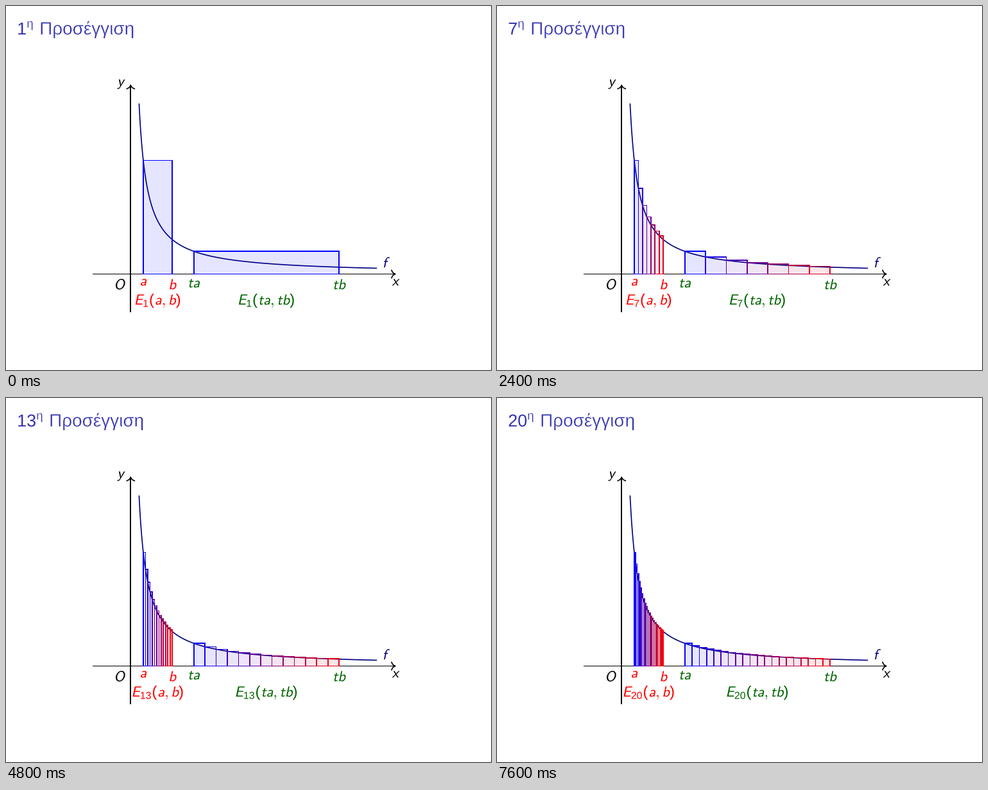
A matplotlib script that plays this animation: 756x567 px, repeating every 8000 ms.

```python
import numpy as np
import matplotlib as mpl
import matplotlib.pyplot as plt
from matplotlib.animation import FuncAnimation
from matplotlib.collections import PolyCollection
from matplotlib.patches import PathPatch
from matplotlib.path import Path
from matplotlib.textpath import TextPath
from matplotlib.transforms import Affine2D

mpl.rcParams["mathtext.fontset"] = "cm"

W, H, DPI = 756, 567, 72          # at 72 dpi one point is one pixel
STEPS, STEP_MS = 20, 400
UNIT = 59.0625                    # pixels per axis unit
X0, Y0 = 194.28, 417.57           # origin of the plot
LINE = 1.66
A, B, T = 1 / 3, 1.1, 5

NAVY = (0, 0, 0.5)
RED = (1, 0, 0)
GREEN = (0, 0.4, 0)
TITLE = (0.2, 0.2, 0.7)

EM, SUB_EM, TITLE_EM, GREEK_EM = 22.74, 17.6, 29.9, 27.9
TITLE_Y, AREA_Y = 44.4, 465.3
SLANT = 0.2126
ADVANCE = {"E": 0.597, "O": 0.736, "a": 0.481, "b": 0.517, "f": 0.306,
           "t": 0.361, "x": 0.461, "y": 0.461, "(": 0.389, ")": 0.389,
           ",": 0.445}
SANS = {"family": "Liberation Sans"}

fig = plt.figure(figsize=(W / DPI, H / DPI), dpi=DPI, facecolor="white")
ax = fig.add_axes([0, 0, 1, 1])
ax.set_xlim(0, W)
ax.set_ylim(H, 0)
ax.axis("off")

glyphs = {}


def px(x):
    return X0 + UNIT * x


def py(y):
    return Y0 - UNIT * y


def place(path, x, y, color, slant=0):
    path = Affine2D.from_values(1, 0, slant, -1, x, y).transform_path(path)
    return ax.add_patch(PathPatch(path, fc=color, lw=0, zorder=5))


def make_glyph(ch, size):
    if ch.isdigit():
        return TextPath((0, 0), ch, size=0.9 * size, prop=SANS)
    if ch in "()":
        return TextPath((0, 0), ch, size=1.05 * size, prop=SANS)
    return TextPath((0, 0), r"$\mathsf{%s}$" % ch, size=size)


def glyph(ch, size):
    if (ch, size) not in glyphs:
        glyphs[ch, size] = make_glyph(ch, size)
    return glyphs[ch, size]


def advance(s, size):
    return size * sum(ADVANCE.get(ch, 0.5) for ch in s)


def run(s, x, y, color, size=EM):
    """Set a run of sans math, letters slanted, and return its patches."""
    out = []
    for ch in s:
        slant = SLANT if ch.isalpha() else 0
        out.append(place(glyph(ch, size), x, y, color, slant))
        x += advance(ch, size)
    return out


def centered(s, x, y, color):
    return run(s, x - advance(s, EM) / 2, y, color)


def greek(s, size, x, y):
    """Greek title text, thinned a little by a white outline."""
    patch = place(TextPath((0, 0), s, size=size, prop=SANS), x, y, TITLE)
    patch.set(edgecolor="white", linewidth=0.35)
    return patch


def area_label(n, args, x, y, color):
    sub, tail = str(n), "(%s)" % args
    sub_w = advance(sub, SUB_EM) + 1
    left = x - (advance("E" + tail, EM) + sub_w) / 2
    sub_x = left + advance("E", EM)
    return (run("E", left, y, color)
            + run(sub, sub_x, y + 3.4, color, SUB_EM)
            + run(tail, sub_x + sub_w, y, color))


def title(n):
    num = str(n)
    x = 17.2
    out = run(num, x, TITLE_Y, TITLE, TITLE_EM)
    x += advance(num, TITLE_EM)
    out.append(greek("η", 19.1, x, 33.8))
    out.append(greek("Προσέγγιση", GREEK_EM, x + 20, TITLE_Y))
    return out


def snap(c):
    """Pixel edges of a grid-fitted stroke centred on c."""
    lo = round(c - LINE / 2)
    return lo, max(round(c + LINE / 2), lo + 1)


def box(x0, y0, x1, y1):
    return [(x0, y0), (x1, y0), (x1, y1), (x0, y1)]


def bars(start, stop, n):
    """Boxes and colours of n outlined bars with left-end heights."""
    boxes, colors = [], []
    edges = np.linspace(start, stop, n + 1)
    base = snap(Y0)
    for i, (u, v) in enumerate(zip(edges[:-1], edges[1:])):
        rgb = (i / n, 0, 1 - i / n)
        left, right, top = snap(px(u)), snap(px(v)), snap(py(1 / u))
        boxes += [box(px(u), py(1 / u), px(v), base[1]),
                  box(left[0], top[0], left[1], base[1]),
                  box(right[0], top[0], right[1], base[1]),
                  box(left[0], top[0], right[1], top[1]),
                  box(left[0], base[0], right[1], base[1])]
        colors += [rgb + (0.1,)] + [rgb + (1,)] * 4
    return boxes, colors


def solid(boxes, colors, zorder):
    return ax.add_collection(PolyCollection(
        boxes, facecolors=colors, linewidths=0, edgecolors="none",
        antialiaseds=False, zorder=zorder), autolim=False)


def arrow_tip(x, y, up):
    pts = np.array([(-5.8, -6.2), (-4.7, -2.5), (-2.4, -0.7), (0, 0),
                    (-2.4, 0.7), (-4.7, 2.5), (-5.8, 6.2)])
    if up:
        pts = np.column_stack([pts[:, 1], -pts[:, 0]])
    path = Path(pts + (x, y), [Path.MOVETO] + [Path.CURVE4] * 6)
    ax.add_patch(PathPatch(path, fc="none", ec="black", lw=LINE,
                           capstyle="round", joinstyle="round", zorder=1))


def draw_static():
    col, row = snap(X0), snap(Y0)
    solid([box(round(px(-1)), row[0], round(px(7) - 1), row[1]),
           box(col[0], round(py(5) + 1), col[1], round(py(-1)))],
          ["black"] * 2, 1)
    arrow_tip(px(7) - 0.9, Y0, False)
    arrow_tip(X0, py(5) + 0.9, True)

    xs = np.geomspace(1 / 4.5, 6.5, 400)
    ax.plot(px(xs), py(1 / xs), color=NAVY, lw=LINE, zorder=2,
            solid_capstyle="butt")

    run("y", 173.3, 124.7, "black")
    run("O", 168.3, 441.3, "black")
    run("f", 586.8, 407.3, NAVY)
    centered("x", px(7) - 1, 435.6, "black")
    centered("a", px(A), 435.6, RED)
    centered("b", px(B), 441.3, RED)
    centered("ta", px(T * A), 438.5, GREEN)
    centered("tb", px(T * B), 441.3, GREEN)


moving = []


def update(i):
    n = i + 1
    while moving:
        moving.pop().remove()
    for k in (1, T):
        moving.append(solid(*bars(k * A, k * B, n), 3))
    mid = (A + B) / 2
    moving.extend(title(n))
    moving.extend(area_label(n, "a,b", px(mid), AREA_Y, RED))
    moving.extend(area_label(n, "ta,tb", px(T * mid), AREA_Y, GREEN))
    return moving


draw_static()
anim = FuncAnimation(fig, update, frames=STEPS, interval=STEP_MS,
                     init_func=lambda: update(0), repeat=True,
                     repeat_delay=0, blit=False)
plt.show()
```
